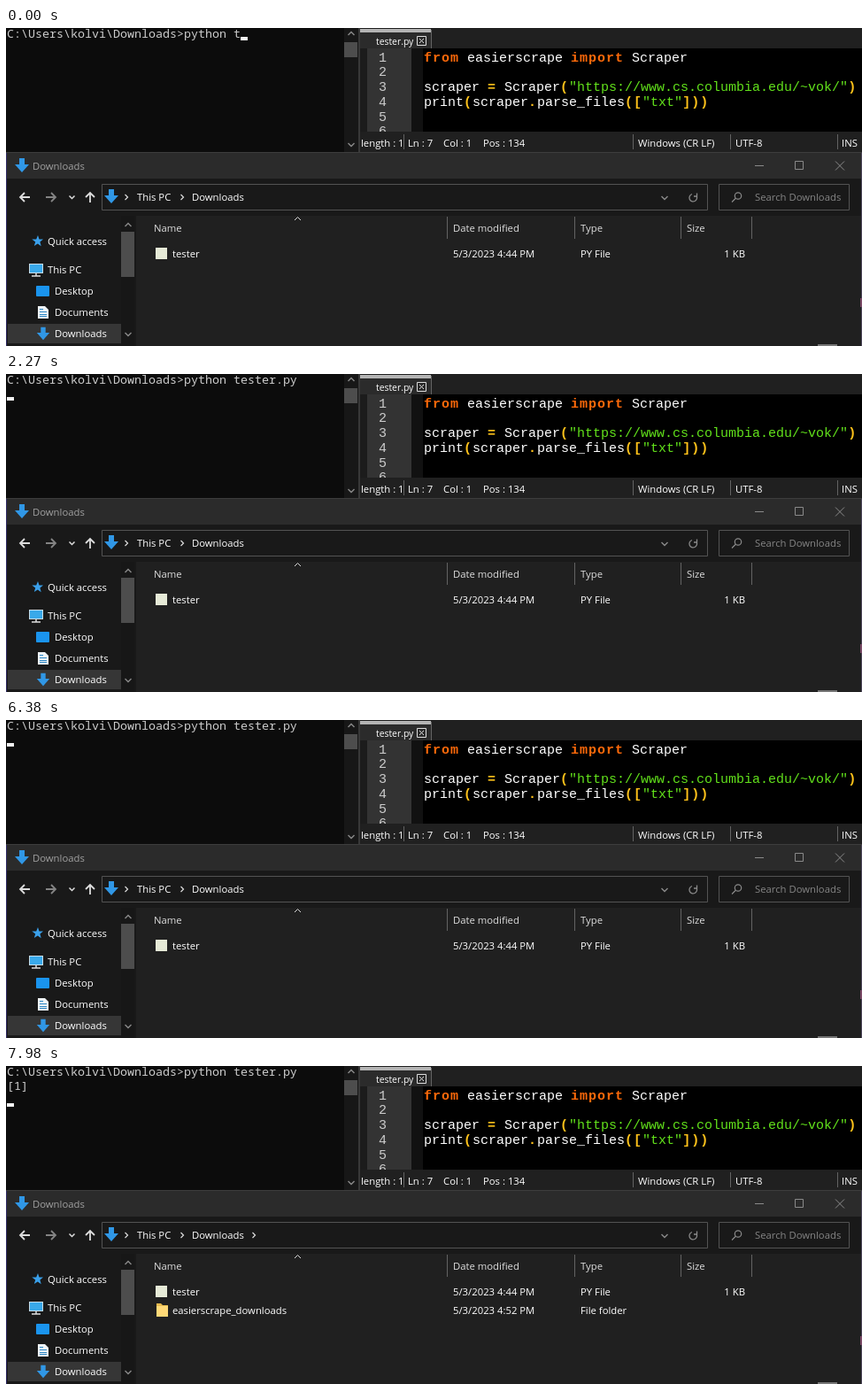
An HTML page for the animation above (8000 ms loop, 967 by 359 pixels).

```html
<!DOCTYPE html>
<html lang="en">
<head>
<meta charset="utf-8">
<title>Scraper run</title>
<style>
  html, body { margin: 0; width: 100%; height: 100%; overflow: hidden; background: #0c0c0c; }
  svg { display: block; }
  text { white-space: pre; font: 11.3px "Open Sans", "Noto Sans", sans-serif; fill: #fff; }
  .console text { font: 13.333px "Noto Sans Mono", "DejaVu Sans Mono", monospace; fill: #ccc; }
  .code text { font: 15px "Liberation Mono", monospace; }
  .code .numbers text { fill: #ccc; }
  .code .tab { font: 10.4px "Open Sans", "Noto Sans", sans-serif; }
  .code tspan { font-weight: bold; letter-spacing: 1px; }
  .key { fill: #ff6a0a; }
  .op { fill: #ffc21a; }
  .code .str { fill: #62e21b; font-weight: normal; letter-spacing: 0; }
  .dim { fill: #a0a0a0; }
  .hint { fill: #858585; }
  .head text { fill: #dedede; }
  .line { fill: none; stroke: #ddd; }
  .gray { stroke: #8a8a8a; }
  .split { stroke: #636363; }
  .border { stroke: #535353; }
</style>
</head>
<body>
<svg width="967" height="359" viewBox="0 0 967 359">
  <defs>
    <path id="right" class="line" d="M-1.5-3L1.5 0L-1.5 3" stroke-width="1.2"/>
    <path id="up" class="line gray" d="M-3.5 2L0-1.5L3.5 2" stroke-width="1.4"/>
    <path id="down" class="line gray" d="M-3.5-2L0 1.5L3.5-2" stroke-width="1.4"/>
    <path id="arrow" class="line" d="M6 0H-5M0-5L-5 0L0 5" stroke-width="1.8"/>
    <path id="download" fill="#3097e6" d="M-3-8H3V-1H8L0 8L-8-1H-3Z"/>
  </defs>

  <g class="console">
    <rect width="382" height="140" fill="#0c0c0c"/>
    <rect x="382" width="16" height="140" fill="#171717"/>
    <rect x="382" y="16" width="15" height="17" fill="#4d4d4d"/>
    <use href="#up" x="390" y="6"/>
    <use href="#down" x="390" y="132"/>
    <text id="command" x="1" y="11"></text>
    <text id="output" x="1" y="27">[1]</text>
    <rect id="cursor" width="8" height="4" fill="#f2f2f2"/>
  </g>

  <g class="code">
    <rect x="398" width="569" height="140" fill="#202020"/>
    <rect x="398" width="2" height="140" fill="#383838"/>
    <rect x="400" y="1" width="80" height="22" fill="#2b2b2b"/>
    <rect x="400" y="1" width="80" height="4" fill="#b4b4b4"/>
    <path class="line split" d="M480.5 2V23"/>
    <text class="tab" x="418" y="19">tester.py</text>
    <path class="line" d="M464.500 9.500h10v10h-10zM467 12l5 5m0-5l-5 5"/>
    <rect x="400" y="23" width="567" height="94" fill="#000"/>
    <rect x="400" y="23" width="8" height="94" fill="#1c1c1c"/>
    <rect x="408" y="23" width="50" height="94" fill="#333"/>
    <rect x="458" y="23" width="13" height="94" fill="#111"/>
    <svg y="23" width="967" height="94" viewBox="0 23 967 94">
      <g class="numbers" id="numbers"></g>
      <text x="472" y="37.500"><tspan class="key">from</tspan> easierscrape <tspan class="key">import</tspan> Scraper</text>
      <text x="472" y="71">scraper <tspan class="op">=</tspan> Scraper<tspan class="op">(</tspan><tspan class="str">"https://www.cs.columbia.edu/~vok/"</tspan><tspan class="op">)</tspan></text>
      <text x="472" y="88">print<tspan class="op">(</tspan>scraper<tspan class="op">.</tspan>parse_files<tspan class="op">([</tspan><tspan class="str">"txt"</tspan><tspan class="op">]))</tspan></text>
    </svg>
  </g>

  <g class="status">
    <path class="line split" d="M449.500 120V137M708.500 120V137M818.500 120V137M939.500 120V137"/>
    <text x="401" y="134">length : 1</text>
    <text x="454" y="134">Ln : 7</text>
    <text x="494" y="134">Col : 1</text>
    <text x="539" y="134">Pos : 134</text>
    <text x="714" y="134">Windows (CR LF)</text>
    <text x="824" y="134">UTF-8</text>
    <text x="944" y="134">INS</text>
  </g>

  <g class="window">
    <rect y="140" width="967" height="219" fill="#202020"/>
    <rect y="140" width="967" height="30" fill="#2b2b2b"/>
    <rect y="170" width="967" height="42" fill="#191919"/>
    <rect y="212" width="147" height="147" fill="#191919"/>
    <rect y="140" width="967" height="1" fill="#3d3d3d"/>
    <rect y="141" width="1" height="218" fill="#35306a"/>
    <rect x="966" y="141" width="1" height="218" fill="#4a4458"/>
    <rect x="965" y="305" width="2" height="10" fill="#7a4a66"/>
    <use href="#download" transform="translate(18 155)"/>
    <text class="dim" x="30" y="160">Downloads</text>
    <path class="line gray" d="M846 155.500h10M891.500 150.500h9v9h-9zM937 150.500l10 10m0-10l-10 10"/>

    <use href="#arrow" x="21" y="191"/>
    <use href="#arrow" transform="translate(51 191) scale(-1 1)" opacity=".55"/>
    <path class="line" stroke-width="1.5" d="M71.500 189.500l3 3l3-3"/>
    <use href="#arrow" transform="translate(95 191) rotate(90)"/>
    <path class="line border" d="M108.500 176.500h684v29h-684zM805.500 176.500h147v29h-147z"/>
    <use href="#download" transform="translate(119 190)"/>
    <use href="#right" x="136" y="191"/>
    <text x="148" y="195">This PC</text>
    <use href="#right" x="199" y="191"/>
    <text x="210" y="195">Downloads</text>
    <use href="#right" id="crumb" x="280" y="191"/>
    <use href="#down" x="744" y="192"/>
    <path class="line gray" stroke-width="1.3" d="M780 189.500A4.300 4.300 0 1 1 775 187.500M780.500 186.500v3.500h-3.500"/>
    <path class="line gray" stroke-width="1.2" d="M824 192.500L820 196.500M823.300 189.500a3.700 3.700 0 1 1 7.400 0a3.700 3.700 0 1 1-7.400 0"/>
    <text class="hint" x="846" y="195">Search Downloads</text>
  </g>

  <g class="sidebar">
    <rect x="2" y="334" width="128" height="22" fill="#363636"/>
    <rect x="130" y="212" width="15" height="147" fill="#171717"/>
    <rect x="130" y="230" width="15" height="51" fill="#4d4d4d"/>
    <use href="#up" x="138" y="222"/>
    <use href="#down" x="138" y="346"/>
    <path fill="#3aa0ea" d="M36 234l1.500 4.500h4.500l-3.600 3l1.300 4.700l-3.900-2.700l-4 2.500l1.400-4.500l-3.900-3l4.900-.1z"/>
    <text x="47" y="245">Quick access</text>
    <rect x="26.500" y="266.500" width="15" height="10" fill="#39a9ea" stroke="#c5dbe7"/>
    <path class="line" stroke-width="1.5" d="M34 277v3M29 280h10"/>
    <text x="47" y="277">This PC</text>
    <rect x="34" y="291" width="15" height="12" rx="1" fill="#1a94ee"/>
    <text x="55" y="301">Desktop</text>
    <path fill="#eef3f6" d="M36 314h8l4 4v10h-12z"/>
    <path class="line" style="stroke:#2d86c4" d="M38 317.500h4M38 320.500h8M38 323.500h8M38 325.500h8"/>
    <text x="55" y="325">Documents</text>
    <use href="#download" transform="translate(42 345) scale(.9)"/>
    <text x="55" y="349">Downloads</text>
  </g>

  <g class="files">
    <g class="head">
      <path class="line" d="M326 217l3.500-3.500l3.500 3.500"/>
      <path class="line split" d="M498.500 213V238M642.500 213V238M762.500 213V238M842.500 213V238"/>
      <text x="167" y="230">Name</text>
      <text x="505" y="230">Date modified</text>
      <text x="649" y="230">Type</text>
      <text x="769" y="230">Size</text>
    </g>
    <rect x="169" y="248" width="13" height="13" fill="#e6ead7"/>
    <text x="188" y="259">tester</text>
    <text x="505" y="259">5/3/2023 4:44 PM</text>
    <text x="649" y="259">PY File</text>
    <text x="835" y="259" text-anchor="end">1 KB</text>
    <g id="folder">
      <path fill="#e5b94e" d="M170 268h5l2 2h6v13h-13z"/>
      <path fill="#ffd977" d="M170 271h13v12h-13z"/>
      <text x="188" y="280">easierscrape_downloads</text>
      <text x="505" y="280">5/3/2023 4:52 PM</text>
      <text x="649" y="280">File folder</text>
    </g>
    <rect x="917" y="357" width="22" height="2" fill="#777"/>
  </g>
</svg>

<script>
const LOOP = 8000, CELL = 8, ROW = 16;
const ENTER = 1400, PRINTED = 6660, FOLDER = 7680, CRUMB = 7980;
const prompt = "C:\\Users\\kolvi\\Downloads>python ";
const script = "tester.py";
// One time per typed letter; two letters land together at 420 ms.
const keyTimes = [0, 130, 280, 420, 420, 570, 710, 1000, 1140];
const blinkTimes = [130, 280, 1690, 2270, 2810, 3230, 3790, 4310, 4860,
                    5420, 5840, 6380, 7540, 7980];

const byId = id => document.getElementById(id);
const passed = (times, t) => times.filter(time => time <= t).length;
const show = (id, visible) => byId(id).setAttribute("visibility", visible ? "visible" : "hidden");

byId("numbers").innerHTML = [1, 2, 3, 4, 5, 6]
  .map(n => `<text x="421" y="${Math.round(21 + n * 16.7)}">${n}</text>`).join("");

function draw(t) {
  const command = prompt + script.slice(0, passed(keyTimes, t));
  const row = passed([ENTER, PRINTED], t);
  byId("command").textContent = command;
  byId("cursor").setAttribute("x", 1 + (row ? 0 : command.length * CELL));
  byId("cursor").setAttribute("y", 10 + row * ROW);
  show("cursor", passed(blinkTimes, t) % 2 === 0);
  show("output", t >= PRINTED);
  show("folder", t >= FOLDER);
  show("crumb", t >= CRUMB);
}

const start = performance.now();
function tick() {
  draw((performance.now() - start) % LOOP);
  requestAnimationFrame(tick);
}
tick();
</script>
</body>
</html>
```
